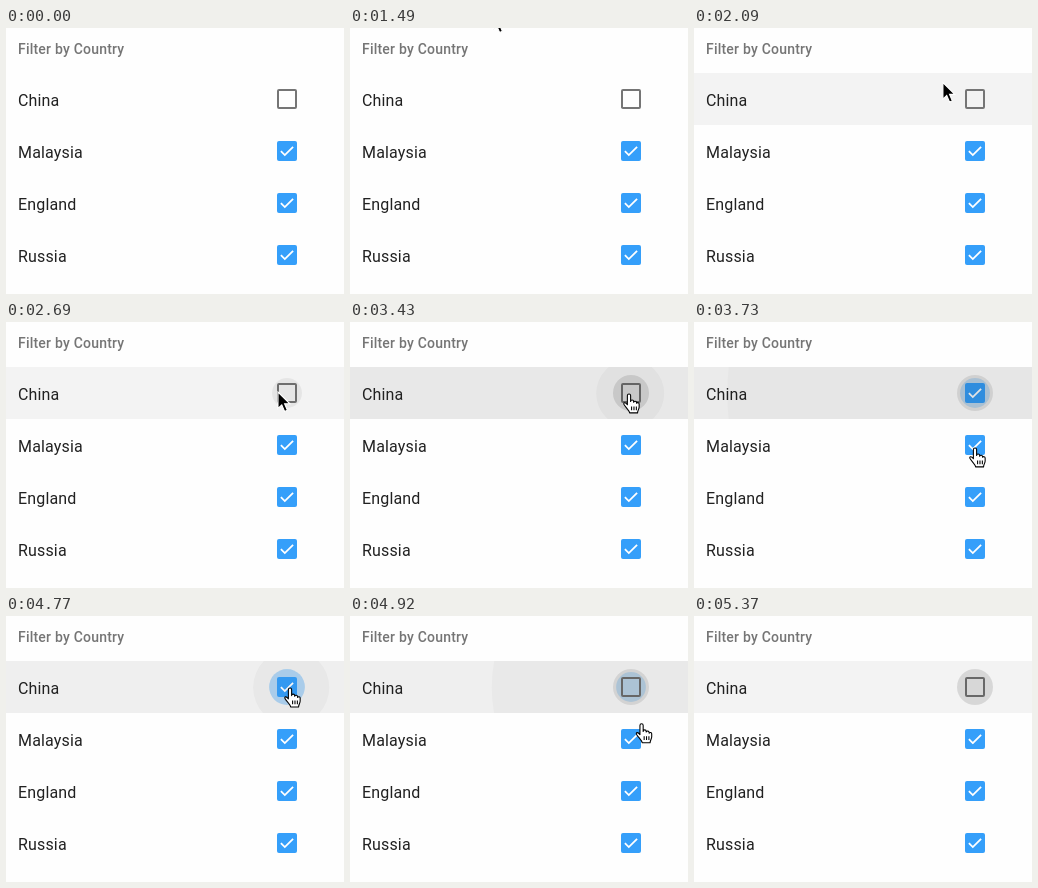
Recreate the animation shown at these times as an HTML page. Size 338 by 266 pixels, loop 5790 ms.

```html
<!DOCTYPE html>
<html lang="en">
<head>
<meta charset="utf-8">
<title>Country filter</title>
<style>
  html, body { margin: 0; width: 100%; height: 100%; overflow: hidden; background: #fefefe; }
  svg { display: block; }
  text { font: 400 16px Roboto, sans-serif; letter-spacing: 0.01em; fill: #212121; }
  .title { font-size: 14px; font-weight: 500; letter-spacing: 0.015em; fill: #757575; }
</style>
</head>
<body>
<svg width="338" height="266" viewBox="0 0 338 266">
  <defs>
    <clipPath id="rowClip"><rect y="45" width="338" height="52"/></clipPath>
    <g id="checked">
      <rect width="20" height="20" rx="2" fill="#359ffa"/>
      <path d="M3.9 10.2 7.8 14.1 16.1 5.8" fill="none" stroke="#fff" stroke-width="1.8"/>
    </g>
  </defs>
  <rect width="338" height="266" fill="#fefefe"/>
  <rect id="row" y="45" width="338" height="52"/>
  <circle id="glow" cx="281" cy="71" fill="#359ffa"/>
  <text class="title" x="12" y="26">Filter by Country</text>
  <g id="list"></g>
  <rect id="empty" x="272" y="62" width="18" height="18" rx="1" fill="none" stroke="#757575" stroke-width="2"/>
  <use id="tick" href="#checked" x="271" y="61"/>
  <g clip-path="url(#rowClip)"><circle id="ripple" cy="71.5"/></g>
  <circle id="halo" cx="281" cy="71"/>
  <path id="arrow" d="M0 0V15.2L3.5 11.9 6.1 18 8.7 16.9 6.1 10.9H11Z" fill="#000" stroke="#fff"/>
  <path id="hand" d="M-1.5 10V1.5a1.5 1.5 0 0 1 3 0V7a1.4 1.4 0 0 1 2.8 0v.6a1.4 1.4 0 0 1 2.7.4v.6a1.3 1.3 0 0 1 2.4.6V12c0 2-1.4 3-1.5 5.5H.6C.4 15.5-3 12.5-4.6 9.8-5.6 8-3.4 7.2-1.5 10ZM2.4 11.5v3.5M4.6 11.5v3.5M6.8 11.5v3.5"
        fill="#fff" stroke="#000" stroke-linejoin="round"/>
</svg>
<script>
const LOOP = 5790;
const HOVER = 2000, FOCUS = 2690, CHECK = 3430, UNCHECK = 4770;
const PRESS = 450;

// The picture moves in bursts of steps and rests between them.
const bursts = [[450, 1040], [1490, 2390], [2690, 2980], [3430, 3880], [4330, 5370]];

// Pointer stops: time, x, y
const stops = [
  [0, 164, -24], [450, 161, -9], [1040, 143, -24], [1490, 143, -15], [2390, 286, 79],
  [2690, 272, 70], [2980, 279, 72], [3430, 279, 72], [3730, 281, 126], [4330, 281, 124],
  [4770, 284, 72], [5370, 330, 290], [LOOP, 330, 290]
];

const $ = id => document.getElementById(id);
const set = (id, attrs) => {
  for (const key in attrs) $(id).setAttribute(key, attrs[key]);
};
const show = (id, on) => set(id, { visibility: on ? "visible" : "hidden" });
const lerp = (a, b, k) => a + (b - a) * k;
const ease = k => k * k * (3 - 2 * k);
const progress = (t, start, length) => Math.min(1, Math.max(0, (t - start) / length));

function stepped(time) {
  const burst = bursts.findLast(([start]) => start <= time);
  if (!burst) return 0;
  const [start, end] = burst;
  const step = (end - start) / Math.round((end - start) / 150);
  return Math.min(end, start + Math.floor((time - start + 10) / step) * step);
}

function pointerAt(t) {
  const i = stops.findIndex(stop => stop[0] > t);
  const [t0, x0, y0] = stops[i - 1];
  const [t1, x1, y1] = stops[i];
  const k = ease((t - t0) / (t1 - t0));
  return [lerp(x0, x1, k), lerp(y0, y1, k)];
}

$("list").innerHTML = ["China", "Malaysia", "England", "Russia"].map((name, i) =>
  `<text x="12" y="${78 + 52 * i}">${name}</text>` +
  (i ? `<use href="#checked" x="271" y="${61 + 52 * i}"/>` : "")
).join("");

function drawRow(t) {
  const start = t < UNCHECK ? CHECK : UNCHECK;
  const age = t - start;
  const pressed = age >= 0 && age < PRESS;
  const k = age / PRESS;
  const shade = start === CHECK ? 0.04 : 0.015;

  set("row", { "fill-opacity": (t > HOVER ? 0.045 : 0) + (pressed ? shade * (1 - k ** 3) : 0) });
  show("ripple", pressed);
  if (pressed) set("ripple", {
    cx: pointerAt(start)[0] + 1.2,
    r: 34 + 0.71 * age,
    "fill-opacity": 0.03 * (1 - k / 2)
  });
}

function drawBox(t) {
  const checked = t > CHECK + 100 && t < UNCHECK + 100;
  show("empty", !checked);
  show("tick", checked);

  // The grey halo turns into a blue glow while the box is checked.
  const focus = progress(t, FOCUS, 290);
  const on = progress(t, CHECK, PRESS) - progress(t, UNCHECK, PRESS);
  set("halo", {
    r: t < FOCUS ? 0 : lerp(15, 18, focus),
    "fill-opacity": lerp(0.055, 0.115, focus) * (1 - on ** 4)
  });
  set("glow", { r: 9 + 9 * on, "fill-opacity": 0.35 * on });
}

function drawPointer(t) {
  const transform = `translate(${pointerAt(t)}) scale(1.08)`;
  const pointing = t > FOCUS;
  set("arrow", { transform });
  set("hand", { transform });
  show("arrow", !pointing);
  show("hand", pointing);
}

const begin = performance.now();
function frame() {
  const t = stepped((performance.now() - begin) % LOOP);
  drawRow(t);
  drawBox(t);
  drawPointer(t);
  requestAnimationFrame(frame);
}
frame();
</script>
</body>
</html>
```
